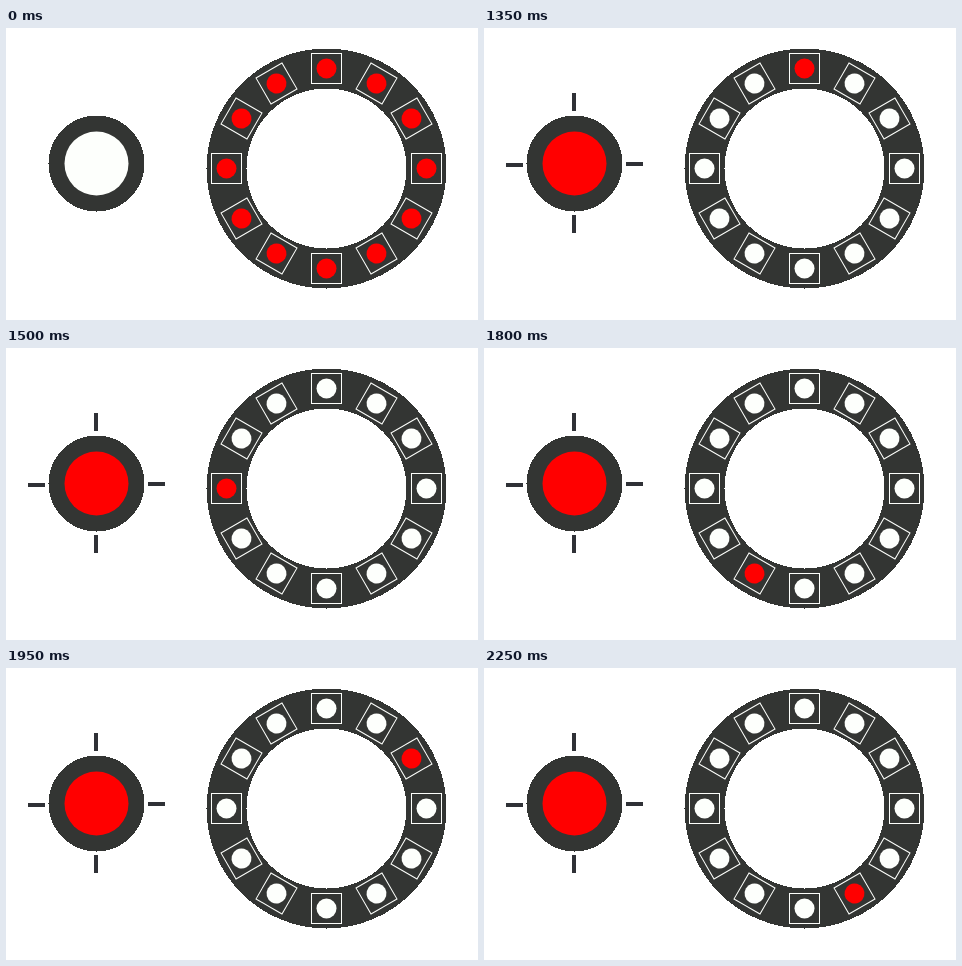
Write an HTML page that moves like this. It is 472 px wide and 292 px high and loops after 2.4 s.

```html
<!DOCTYPE html>
<html lang="en">
<head>
<meta charset="utf-8">
<title>LED ring</title>
<style>
  html, body { margin: 0; width: 100%; height: 100%; overflow: hidden; background: #fff; }
  svg { display: block; width: 472px; height: 292px; }
  .hard { shape-rendering: crispEdges; }
</style>
</head>
<body>
<svg id="stage" viewBox="0 0 472 292">
  <circle class="hard" cx="90.5" cy="135.5" r="48" fill="#333533"/>
  <circle id="button" cx="90.5" cy="135.5" r="32"/>
  <g id="rays" class="hard" fill="#2f3136">
    <rect x="88" y="65" width="4" height="18"/>
    <rect x="88" y="187" width="4" height="18"/>
    <rect x="22" y="135" width="17" height="4"/>
    <rect x="142" y="134" width="17" height="4"/>
  </g>
  <circle class="hard" cx="320.5" cy="140.5" r="100" fill="none" stroke="#333533" stroke-width="40"/>
  <g id="leds"></g>
</svg>
<script>
const RED = '#ff0000', OFF = '#fdfffc';
const IDLE = 1200, STEP = 150, LOOP = 2400;
const order = [2, 0, 9, 5, 7, 2, 10, 5]; // lit LED per step, clockwise from the top

const byId = id => document.getElementById(id);
const button = byId('button'), rays = byId('rays');

function add(parent, tag, attrs) {
  const el = document.createElementNS('http://www.w3.org/2000/svg', tag);
  for (const key in attrs) el.setAttribute(key, attrs[key]);
  return parent.appendChild(el);
}

const snap = v => Math.round(v / 5) * 5;

const leds = Array.from({ length: 12 }, (_, i) => {
  const a = i * Math.PI / 6;
  const x = 320.5 + snap(100 * Math.sin(a));
  const y = 140.5 - snap(100 * Math.cos(a));
  const g = add(byId('leds'), 'g', { transform: `translate(${x} ${y}) rotate(${i * 30})` });
  add(g, 'rect', { x: -15, y: -15, width: 30, height: 30, fill: 'none', stroke: OFF });
  return add(g, 'circle', { r: 10 });
});

function draw(ms) {
  const t = ms % LOOP;
  const pressed = t >= IDLE;
  const lit = pressed ? order[Math.floor((t - IDLE) / STEP)] : -1;
  button.setAttribute('fill', pressed ? RED : OFF);
  rays.setAttribute('visibility', pressed ? 'visible' : 'hidden');
  leds.forEach((led, i) => led.setAttribute('fill', !pressed || i === lit ? RED : OFF));
}

const start = performance.now();
function tick() {
  draw(performance.now() - start);
  requestAnimationFrame(tick);
}
tick();
</script>
</body>
</html>
```
